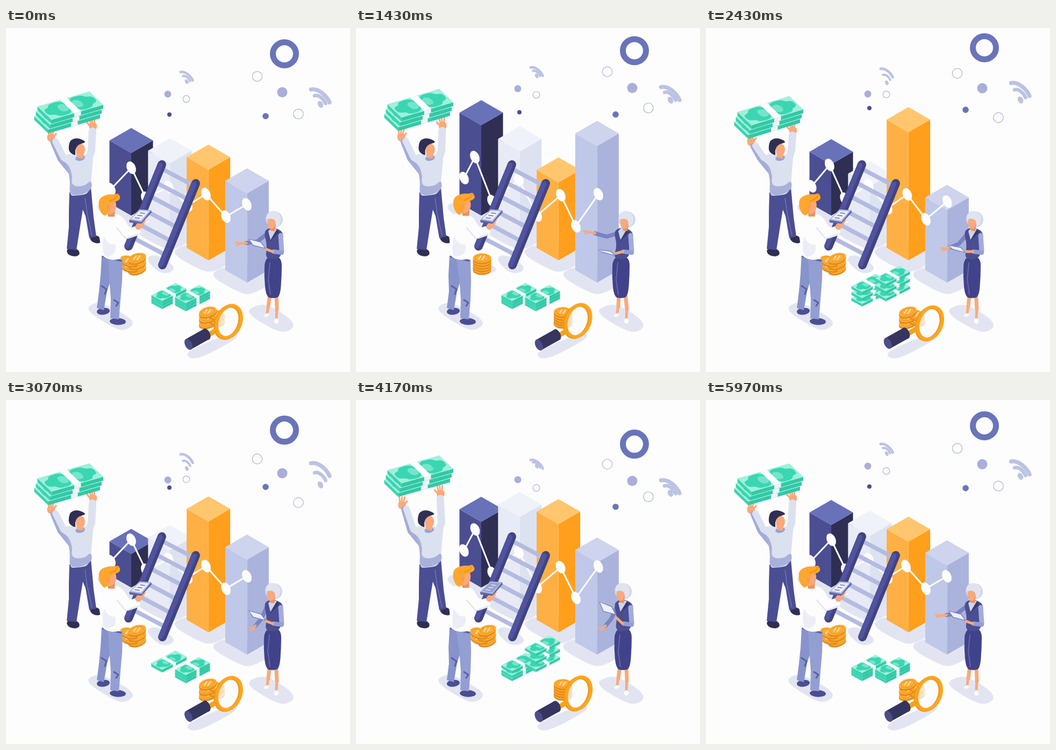
These frames come from a looping animation (640 px wide and 640 px high, 6.01 s). An HTML page with a canvas:

```html
<!DOCTYPE html>
<html lang="en">
<head>
<meta charset="utf-8">
<title>Isometric finance scene</title>
<style>
html, body { margin: 0; width: 100%; height: 100%; overflow: hidden; background: #fdfdfd; }
canvas { display: block; width: 640px; height: 640px; }
</style>
</head>
<body>
<canvas id="stage" width="640" height="640"></canvas>
<script>
const ctx = document.getElementById('stage').getContext('2d');
const LOOP = 6010, HALF = LOOP / 2, STEP = LOOP / 180;

const PAPER = '#fdfdfd', SHADE = '#e2e5f1', BLUE = '#6a74ba', MIST = '#a9afda', PALE = '#dce1f0';
const INDIGO = '#4b4e92', NIGHT = '#2f2f54', STEEL = '#939fd3', SKIN = '#f9a97a', AMBER = '#ffa41f';

// ---- motion helpers ----
const mix = (a, b, k) => a + (b - a) * k;
const ease = k => (1 - Math.cos(Math.PI * Math.max(0, Math.min(1, k)))) / 2;

// Eased, looping path through [time, value] keys; the first key is at 0.
function path(keys, period = LOOP) {
  const all = [...keys, [period, keys[0][1]]];
  return t => {
    t = ((t % period) + period) % period;
    const i = all.findIndex(k => k[0] > t);
    const [t0, a] = all[i - 1], [t1, b] = all[i];
    return mix(a, b, ease((t - t0) / (t1 - t0)));
  };
}
const even = (vals, period = LOOP) => path(vals.map((v, i) => [i * period / vals.length, v]), period);
const bell = (t, centre, width = 650) => {
  const d = Math.abs(t - centre) / width;
  return d < 1 ? Math.cos(d * Math.PI / 2) ** 2 : 0;
};

// ---- drawing helpers ----
function trace(p) {
  ctx.beginPath();
  for (let i = 0; i < p.length; i += 2) ctx.lineTo(p[i], p[i + 1]);
}
function fill(color) {
  ctx.fillStyle = color;
  ctx.fill();
}
function poly(color, ...p) {
  trace(p);
  fill(color);
}
function line(color, w, ...p) {
  trace(p);
  ctx.lineCap = ctx.lineJoin = 'round';
  ctx.lineWidth = w;
  ctx.strokeStyle = color;
  ctx.stroke();
}
function blob(color, ...p) {
  const n = p.length;
  ctx.beginPath();
  ctx.moveTo((p[n - 2] + p[0]) / 2, (p[n - 1] + p[1]) / 2);
  for (let i = 0; i < n; i += 2) {
    const j = (i + 2) % n;
    ctx.quadraticCurveTo(p[i], p[i + 1], (p[i] + p[j]) / 2, (p[i + 1] + p[j + 1]) / 2);
  }
  fill(color);
}
function oval(color, x, y, rx, ry = rx, rot = 0) {
  ctx.beginPath();
  ctx.ellipse(x, y, rx, ry, rot, 0, 7);
  fill(color);
}
function hoop(color, w, x, y, rx, ry = rx, rot = 0) {
  ctx.beginPath();
  ctx.ellipse(x, y, rx, ry, rot, 0, 7);
  ctx.lineWidth = w;
  ctx.strokeStyle = color;
  ctx.stroke();
}
function shifted(x, y, draw) {
  ctx.save();
  ctx.translate(x, y);
  draw();
  ctx.restore();
}

// ---- floating shapes: one drift, started at different moments ----
const drift = path([[0, 0], [1700, -12], [3400, 35], [5100, 0]]);
const floatY = (t, y, start) => y + drift(t - start);

function drawDots(t) {
  const spot = (color, x, y, r, start) => oval(color, x, floatY(t, y, start), r);
  const bubble = (x, y, r, start) => hoop('#aeb3d6', 1.2, x, floatY(t, y, start), r);
  hoop(BLUE, 11, 518, floatY(t, 48, 600), 21.5);
  spot(MIST, 301, 123, 6.5, 170);
  bubble(335.5, 132, 6.3, 430);
  spot(INDIGO, 304, 161, 4, 750);
  bubble(467.5, 90, 9.2, 330);
  spot(MIST, 514, 119.5, 9.5, 400);
  bubble(544, 160, 9.2, 0);
  spot(BLUE, 483, 164, 5.8, 860);
}
function drawSignal(t, x, y, k, start, lag) {
  const arc = (dx, dy, w, size, delay) => {
    const top = floatY(t, y + dy * k, start - delay);
    line('#bcc3e3', 0);
    ctx.beginPath();
    ctx.moveTo(x + dx * k, top);
    ctx.bezierCurveTo(x + (dx + 13 * size) * k, top - 3 * k, x + (dx + 29 * size) * k, top + 11 * k * size,
      x + (dx + 34.5 * size) * k, top + 24 * k * size);
    ctx.lineWidth = w * k;
    ctx.strokeStyle = '#bcc3e3';
    ctx.stroke();
  };
  arc(4.5, 4.5, 7.5, 1, 0);
  arc(11, 16, 6.5, 0.6, lag / 2);
  oval('#bcc3e3', x + 22 * k, floatY(t, y + 32 * k, start - lag), 4.8 * k, 6.8 * k, -0.45);
}

// ---- chart ----
const bars = [
  { y: even([186, 134, 240, 172]), c: ['#6872b9', '#4b4e90', NIGHT] },
  { y: t => even([211, 174, 250, 171])(t + 400), c: ['#f0f2f9', '#e8ebf6', '#dde2f1'] },
  { y: even([217, 250, 147, 202, 163]), c: ['#ffc66e', '#ffb044', '#ff9f1b'] },
  { y: even([261, 161, 292, 221, 297]), c: ['#ced4ed', '#bfc8e8', '#aab3dc'] }
];
bars.forEach((b, i) => { b.x = 233 + i * 71.8; b.foot = 349 + i * 41.6; });

function drawBar({ x, foot, y: height, c }, t) {
  const y = height(t), w = 40.5, h = 23.3;
  poly(c[1], x - w, y + h, x, y + 2 * h, x, foot, x - w, foot - h);
  poly(c[2], x + w, y + h, x, y + 2 * h, x, foot, x + w, foot - h);
  poly(c[0], x, y, x + w, y + h, x, y + 2 * h, x - w, y + h);
}
function barShadow({ x, foot: y }) {
  blob(SHADE, x - 72, y - 14, x - 44, y - 30, x, y - 32, x + 58, y - 6, x + 8, y + 24, x - 18, y + 17);
}

const swing = path([[0, 0], [1350, 1]], HALF);
const nodes = [[195, 300, 6, -21], [233, 260, -12, -20], [260, 316, -7, 6], [303, 296, 0, -14],
  [338, 330, -1, 19], [372, 309, 9, 2], [409, 351, 0, 18], [448, 328, 3, -19]];
function drawTrend(t) {
  const k = swing(t), pts = nodes.map(([x, y, dx, dy]) => [x + dx * k, y + dy * k]);
  line(PAPER, 3, ...pts.flat());
  for (const [x, y] of pts) oval(PAPER, x, y, 8.2, 12.2, -0.42);
}

function drawLadder() {
  for (let i = 0; i < 6; i++) {
    const x = 292 - i * 10.5, y = 263 + i * 25.8;
    line('#b4bbe0', 8, x, y, x + 53, y + 28);
  }
  for (const [x, y] of [[290, 254], [353, 289]]) {
    line('#41447f', 16, x, y, x - 62, y + 152);
    line('#5053a0', 9, x - 3, y + 1, x - 65, y + 151);
  }
}

// ---- banknotes on a plane spanned by u (long side) and v (short side) ----
function note(x, y, u, v, h) {
  const at = (...ab) => ab.map((_, i) => {
    const k = i % 2, j = i - k;
    return (k ? y : x) + u[k] * ab[j] + v[k] * ab[j + 1];
  });
  const wall = (color, ...ab) => {
    const [a, b, c, d] = at(...ab);
    poly(color, a, b, c, d, c, d + h, a, b + h);
  };
  wall('#3bd3b0', 0, 0, 0, 1);
  wall('#33c8a6', 0, 1, 1, 1);
  poly('#a0f0da', ...at(0, 0, 1, 0, 1, 1, 0, 1));
  for (const s of [0, 1]) {
    const f = a => s ? 1 - a : a;
    blob('#3ad6b2', ...at(f(0.03), 0.3, f(0.15), 0.25, f(0.18), 0.05, f(0.46), 0.05,
      f(0.46), 0.95, f(0.18), 0.95, f(0.15), 0.75, f(0.03), 0.7));
    blob('#74e5cb', ...at(f(0.28), 0.25, f(0.44), 0.25, f(0.44), 0.75, f(0.28), 0.75));
  }
  poly(PAPER, ...at(0.44, 0, 0.57, 0, 0.57, 1, 0.44, 1));
  wall('#f1f3f8', 0.44, 1, 0.57, 1);
}

// Ground piles hop; lower notes follow late (lag) or less (fade)
const piles = [
  { x: 270.5, y: 497, hops: [2650, 4650], lift: 22, lag: 120, fade: 0 },
  { x: 314.5, y: 501, hops: [2300, 4170], lift: 40, lag: 0, fade: 0.24 }
];
function drawPile(p, t) {
  for (let i = 2; i >= 0; i--) {
    const up = p.hops.reduce((sum, c) => sum + bell(t, c + i * p.lag), 0) * p.lift * (1 - p.fade * i);
    note(p.x, p.y + i * 5 - up, [45, -23], [20, 11], 5);
  }
}

// Coins: a loose heap that gathers into a neat column
function coin(x, y, tilt) {
  oval('#e28a1a', x, y + 3, 17, 9, tilt);
  oval('#ffad35', x, y, 17, 9, tilt);
  hoop('#e2921f', 1, x, y, 13, 6.5, tilt);
  line('#ffe6b8', 2, x - 6, y + 2, x - 2, y - 4);
  line('#ffe6b8', 2, x, y + 3, x + 5, y - 4);
}
function drawHeap(x, y, side, t, ...gather) {
  const loose = 1 - gather.reduce((sum, c) => sum + bell(t, c), 0);
  oval(SHADE, x + 4, y + 21, 22, 9);
  for (let i = 4; i >= 0; i--) {
    const zig = i % 2 ? -1 : 1;
    coin(x + (2 + zig * 7.5) * side * loose, y + i * 4.9, zig * -0.28 * loose);
  }
}

const peer = even([0.4, 0.5, 0, 1.1], HALF);
function drawLens(t) {
  const m = peer(t);
  shifted(m * 3.5 - 1.5, m * 4.5 - 2, () => {
    oval('rgba(252,252,254,.72)', 414, 547, 22, 32, 0.38);
    line('rgba(255,255,255,.8)', 6, 401, 563, 424, 531);
    hoop('#ec9812', 6, 412.5, 547.5, 21.5, 31, 0.38);
    hoop(AMBER, 6, 415, 546.5, 21.5, 31, 0.38);
  });
  shifted(0.8 - m * 2, 1.2 - m * 3, () => {
    line('#f5a21a', 9, 378, 570, 390, 563);
    poly('#35355f', 335, 578.5, 368, 560, 378, 579, 344, 598);
    oval('#35355f', 373, 569.5, 6.5, 11, -0.45);
    oval('#4c4e88', 339.5, 588.5, 6.5, 11, -0.45);
  });
}

// ---- man tossing the cash ----
const cashY = even([146, 128, 163], HALF);
const cashTilt = even([-28, -27, -31], HALF);
const reach = even([0, -10, 13], HALF);
function drawTosser(t) {
  const d = reach(t), k = bell(t % HALF, 1050, 500), lx = 83 + 2 * k, rx = 161 - 5 * k;
  oval(NIGHT, 125, 417, 12, 7.5, 0.2);
  oval(NIGHT, 167, 393, 11, 7, 0.35);
  poly(INDIGO, 118, 306, 158, 297, 161, 330, 163, 352, 168, 388, 155, 391, 148, 350, 143, 338,
    139, 362, 131, 413, 113, 411, 117, 370, 117, 340);
  line('#7f88c6', 1, 147, 316, 151, 345, 160, 386);
  for (const [x, y, s] of [[lx, 200 + d, 1], [rx, 179 + d, -1]]) {
    blob(SKIN, x - 7, y - 3, x + 7, y - 3, x + 9, y + 5, x + 5, y + 12, x - 6, y + 11);
    for (let f = -1; f < 2; f++) line(SKIN, 3, x + f * 3, y, x + f * 5 + s, y - 11);
    line(SKIN, 3.5, x + 4 * s, y + 4, x + 10 * s, y - 3);
  }
  line('#a3acd8', 13, lx + 6, 212 + d, 102, 243, 124, 270);
  line(PALE, 12, lx + 9, 211 + d, 107, 241, 130, 256);
  line(PALE, 14, rx, 192 + d, 159, 228, 150, 256);
  blob(PALE, 104, 236, 128, 234, 150, 236, 163, 236, 160, 262, 157, 308, 132, 312, 117, 312, 122, 270);
  blob('#a9b1da', 110, 248, 121, 262, 125, 292, 144, 294, 160, 282, 159, 305, 117, 315, 120, 282);
  blob(PALE, 120, 244, 155, 240, 160, 280, 146, 295, 121, 294, 124, 270);
  shifted(-2 * k, 0, () => {
    oval('#98a2d2', 138, 242, 9, 5, -0.2);
    poly(SKIN, 131, 230, 144, 232, 143, 243, 132, 241);
    oval(SKIN, 138.5, 227, 8.5, 11.5, 0.1);
    blob(NIGHT, 116, 224, 119, 208, 134, 204, 150, 212, 141, 215, 133, 218, 128, 228, 130, 238, 119, 232);
  });
  for (let i = 2; i >= 0; i--)
    note(58.5 - 3 * i, cashY(t) + 9 * i, [96.5, cashTilt(t)], [26, 25], 7);
}

// ---- man with the clipboard ----
const lean = even([0, 0.9, 1, 0.1], HALF);
function drawClerk(t) {
  const q = lean(t), hip = -4 * q, flipped = bell(t, 4170) > 0.5;
  oval(INDIGO, 181, 527, 12, 6.5, -0.1);
  oval(INDIGO, 208, 546, 15, 6.5, 0.05);
  poly('#8793cb', 178 + hip, 424, 200 + hip, 428, 197, 462, 188, 490, 182, 525, 169, 521, 173, 490, 176 + hip, 460);
  poly(STEEL, 190 + hip, 426, 217 + hip, 431, 216 + hip / 2, 470, 213, 505, 210, 542, 194, 540, 195, 505, 192, 465);
  line('#5a61a8', 3, 178, 480, 187, 486, 184, 495);
  line('#5a61a8', 3, 201, 506, 209, 511, 205, 517);
  line('#5a61a8', 3, 180 + hip, 425, 214 + hip, 433);
  blob(PAPER, 172, 350, 196, 342, 222, 352, 219, 390, 217 + hip, 434, 176 + hip, 428, 176, 395, 166, 365);
  blob('#eceef6', 182, 384, 203, 395, 205, 420, 184 + hip, 428, 179, 408);
  blob(PAPER, 180, 350, 209, 348, 209, 404, 190, 402, 178, 380);
  line(PAPER, 18, 212, 360, 226, 383, 241, 378);
  line('#dfe3f0', 2, 206, 372, 223, 392, 246, 383);
  shifted(2 * q, 0, () => {
    blob(SKIN, 238, 369, 250, 358, 261, 354, 257, 366, 246, 378);
    poly('#5f67a8', 229, 358, 248, 338, 270, 339, 271, 343, 252, 364, 230, 362);
    poly('#b2b9dd', 229, 357, 248, 337.5, 270, 339, 252, 361);
    poly(flipped ? '#98a1cf' : '#eceef8', 233, 355, 249, 340, 266, 341, 251, 358);
    for (let i = 0; i < 3; i++)
      line(flipped ? '#e6e9f5' : '#6a72b0', 1.6, 240 + i * 5, 353 - i * 4.5, 248 + i * 5, 354 - i * 4.5);
  });
  shifted(8.5 * q, -1.5 * q, () => {
    poly('#e8925f', 188, 335, 203, 335, 202, 351, 190, 351);
    oval(SKIN, 194, 331, 11, 15, 0.1);
    blob('#ffa62e', 172, 332, 173, 317, 188, 309, 203, 310, 209, 307, 214, 318, 203, 324, 194, 325, 194, 340, 184, 351, 176, 343);
    line('#ec9018', 2, 193, 322, 204, 317, 208, 311);
    oval('#f0996a', 190, 334, 3, 4);
  });
}

// ---- woman: arm goes from pointing (-1) to lowered (1) ----
const arm = path([[0, 0], [1500, -0.9], [3000, 1], [4200, 1], [5000, 0]]);
const pad = path([[0, 0], [1500, -1], [4500, 0.9]]);
const bob = even([0, 5, -1, -2]);
const sway = even([0, -4, -1, 0]);
function drawWoman(t) {
  const s = sway(t), a = arm(t), p = pad(t);
  const hx = 433 + a * (a > 0 ? 24 : 4), hy = 401 + 24 * a;
  const px = 451 + p, py = 392 - 20 * p, tilt = 13 + 7 * p;
  line(SKIN, 7, 491 + s / 2, 495, 488, 518);
  line(SKIN, 5, 488, 515, 486, 530);
  line(SKIN, 7, 503 + s / 2, 495, 504, 523);
  line(SKIN, 5, 504, 520, 503, 540);
  oval(PAPER, 485, 534, 5, 3, -0.4);
  oval(PAPER, 503, 545, 4, 5);
  blob('#41438a', 482 + s, 424, 513 + s, 424, 513 + s, 460, 510 + s, 500, 498 + s, 503, 484 + s, 501, 480 + s, 462);
  line('#6268ad', 2, 491 + s, 437, 488 + s, 468, 492 + s, 496);
  // far arm
  const ex = 466 + 0.3 * (hx - 429), ey = mix(387, 408, (a + 1) / 2);
  const wx = mix(ex, hx, 0.58), wy = mix(ey, hy, 0.7);
  line('#7983c2', 7.5, 487, 382, ex, ey, wx, wy);
  line(SKIN, 4.5, wx, wy, hx + 2, hy);
  line(SKIN, 3, hx + 5, hy, hx - 6, hy - 2);
  line(SKIN, 3, hx + 4, hy + 1, hx - 4, hy + 3);
  // torso and near arm
  blob(INDIGO, 479, 378, 494, 370, 512, 376, 517, 388, 510 + s / 2, 405, 513 + s, 429, 482 + s, 431, 486, 404);
  poly('#cfd5ec', 488, 378, 493, 372, 504, 374, 492, 394);
  poly('#383a74', 504, 375, 509, 380, 496, 392, 490, 400);
  line('#a3acda', 9, 511, 386, 513, 415);
  line(STEEL, 8, 513, 418, 498, 416);
  line(SKIN, 5, 496, 416, mix(486, px + 31, 0.5), mix(411, py + tilt + 7, 0.6));
  poly('#7c86c2', px, py, px + 24, py + tilt * 0.45, px + 33, py + tilt + 6, px + 8, py + tilt);
  poly('#eef0f9', px + 2, py + 1.5, px + 23, py + tilt * 0.45 + 1.5, px + 30, py + tilt + 4, px + 9, py + tilt - 1.5);
  shifted(bob(t), 0, () => {
    oval('#d0d6ea', 499, 356, 16, 15, 0.2);
    poly('#e8925f', 490, 364, 502, 364, 500, 378, 492, 377);
    oval(SKIN, 494, 362, 7.5, 11.5);
    blob('#e0e4f1', 483, 357, 486, 343, 500, 339, 513, 350, 509, 367, 502, 370, 502, 358, 493, 354);
  });
}

function drawShadows() {
  bars.forEach(barShadow);
  blob(SHADE, 258, 428, 280, 420, 316, 444, 306, 456, 284, 456);
  blob(SHADE, 146, 524, 166, 510, 186, 514, 244, 546, 222, 564, 200, 558);
  blob(SHADE, 444, 528, 468, 514, 492, 516, 542, 550, 522, 568, 494, 560);
  blob(SHADE, 334, 610, 346, 597, 420, 566, 434, 572, 416, 586, 354, 618);
}

function render(t) {
  ctx.fillStyle = PAPER;
  ctx.fillRect(0, 0, 640, 640);
  drawDots(t);
  drawSignal(t, 322, 79, 0.65, 340, 230);
  drawSignal(t, 563, 110, 1, 720, 300);
  drawShadows();
  bars.forEach(b => drawBar(b, t));
  drawTrend(t);
  drawTosser(t);
  drawLadder();
  drawHeap(234.5, 428, 1, t, 1430, 4930);
  drawClerk(t);
  piles.forEach(p => drawPile(p, t));
  drawHeap(385, 528, -1, t, 1430, 4170);
  drawLens(t);
  drawWoman(t);
}

let start;
function tick(now) {
  start ??= now;
  const t = (now - start) % LOOP;
  render(Math.floor((t + 8) / STEP) * STEP % LOOP);
  requestAnimationFrame(tick);
}
requestAnimationFrame(tick);
</script>
</body>
</html>
```
